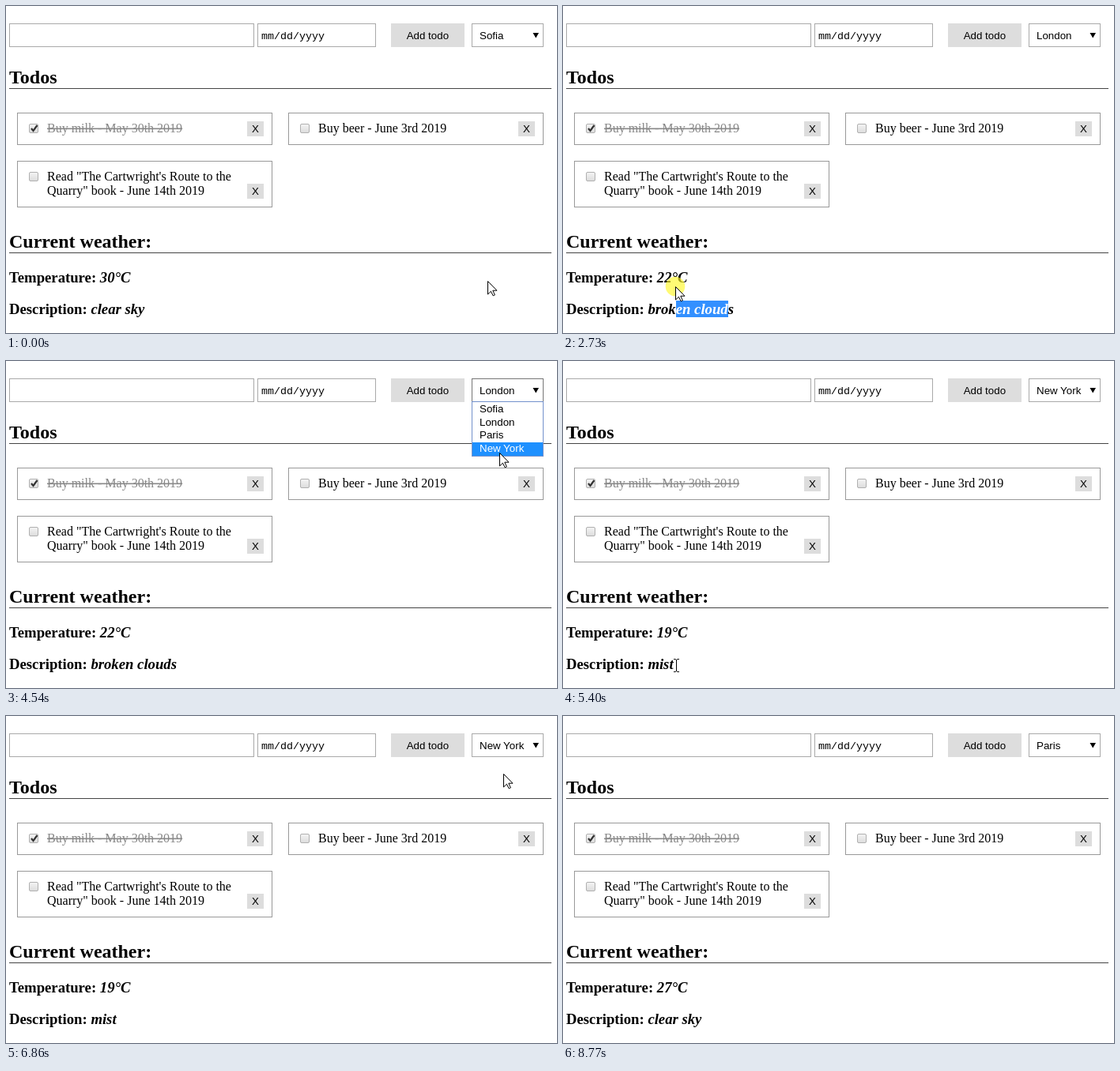
An HTML page for the animation above (9.64 s loop, 697 by 414 pixels).

```html
<!DOCTYPE html>
<html lang="en">
<head>
<meta charset="utf-8">
<title>Todos and weather</title>
<style>
  html, body { margin: 0; width: 100%; height: 100%; overflow: hidden; background: #fff; }
  svg { position: absolute; left: 0; top: 0; }
  text { white-space: pre; }
  .serif { font: 16px "Liberation Serif", "Times New Roman", serif; }
  .head { font: bold 24px "Liberation Serif", "Times New Roman", serif; }
  .sans { font: 13.333px "Liberation Sans", Arial, sans-serif; }
  .mono { font: 13.333px "Liberation Mono", "Courier New", monospace; }
  .done { fill: #888; text-decoration: line-through; }
  h3 {
    position: absolute; left: 4px; margin: 0; white-space: pre;
    font: bold 18.72px/21px "Liberation Serif", "Times New Roman", serif;
  }
  #temp { top: 333px; }
  #desc { top: 373px; }
  mark { background: #3390ff; color: #fff; }
</style>
</head>
<body>
<svg id="page" width="697" height="414"></svg>
<h3 id="temp"></h3>
<h3 id="desc"></h3>
<svg id="overlay" width="697" height="414">
  <g id="list"></g>
  <g id="pointer">
    <circle id="halo" r="12.3" fill="#fff82a" fill-opacity=".65"/>
    <path id="arrow" d="M.5 .5V17L4.4 13.2L7.2 18.8L9.4 17.8L6.8 12.2H12Z" fill="#fff" stroke="#000"/>
    <path id="beam" d="M-3 -7.5H-1L.5 -6.5L2 -7.5H4M.5 -6.5V7.5M-3 8.5H-1L.5 7.5L2 8.5H4" fill="none" stroke="#000"/>
    <path id="hand" d="M-1.5 1.5Q0 -.5 1.5 1.5V7Q3 5.5 4.5 7.5Q6 6.5 7.5 8.5Q10.5 7.5 10.5 10.5V15L8.5 21.5H-1L-5.5 13Q-5.5 10.5 -3.5 11.5L-1.5 13.5Z" fill="#fff" stroke="#000"/>
  </g>
</svg>
<script>
const LOOP = 9640, TICK = 77;
const $ = id => document.getElementById(id);

const cities = ["Sofia", "London", "Paris", "New York"];
const weather = [["30°C", "clear sky"], ["22°C", "broken clouds"], ["27°C", "clear sky"], ["19°C", "mist"]];

// Pointer moves: first step, last step, x, y
const moves = [
  [70, 130, 609, 93], [380, 530, 615, 47], [1170, 1170, 616, 47], [1420, 1420, 624, 67],
  [1500, 1660, 624, 84], [1890, 2270, 209, 385], [2420, 2500, 143, 383], [2580, 2730, 142, 355],
  [2810, 2880, 122, 340], [3130, 3210, 263, 369], [3530, 3690, 570, 27], [3840, 3910, 597, 40],
  [4310, 4540, 624, 116], [5000, 5400, 143, 385], [5550, 5630, 108, 384], [5710, 5860, 112, 366],
  [5940, 6010, 123, 353], [6320, 6400, 200, 362], [6470, 6860, 629, 73], [7030, 7110, 620, 40],
  [7270, 7430, 622, 95], [7780, 8620, 593, 405], [8700, 8700, 570, 408], [8770, 8770, 570, 440]
];

// pick: [description from, to, temperature from]
const events = [
  [0, { city: 0, sky: 0, open: false, press: false, pick: null }],
  [850, { press: true }], [930, { open: true }], [1010, { press: false }],
  [1810, { press: true }], [1890, { open: false, city: 1 }], [1960, { press: false }],
  [2120, { sky: 1 }],
  [2350, { press: true }], [2420, { pick: [8, 12] }], [2500, { pick: [4, 12] }],
  [2810, { pick: [0, 12, 2] }], [2880, { pick: [0, 12, 0] }], [3050, { press: false }],
  [3290, { press: true, pick: null }], [3360, { press: false }],
  [4230, { press: true }], [4310, { open: true }], [4390, { press: false }],
  [4920, { press: true }], [5000, { open: false, city: 3 }], [5080, { press: false }],
  [5230, { sky: 3 }],
  [5470, { press: true }], [5550, { pick: [2, 4] }], [5630, { pick: [0, 4] }],
  [5940, { pick: [0, 4, 1] }], [6010, { pick: [0, 4, 0] }], [6170, { press: false }],
  [6400, { press: true, pick: null }], [6470, { press: false }],
  [7190, { press: true, open: true }], [7350, { press: false }],
  [7700, { press: true }], [7780, { open: false, city: 2 }], [7860, { press: false }],
  [8010, { sky: 2 }]
];

const text = (x, y, style, s, extra = "") => `<text x="${x}" y="${y}" class="${style}" ${extra}>${s}</text>`;
const fill = (x, y, w, h, color) => `<rect x="${x}" y="${y}" width="${w}" height="${h}" fill="${color}"/>`;
const frame = (x, y, w, h, color, extra = "") =>
  `<rect x="${x + .5}" y="${y + .5}" width="${w - 1}" height="${h - 1}" fill="#fff" stroke="${color}" ${extra}/>`;

function card(x, y, h, lines, done) {
  const tick = `<path d="M${x + 18} ${y + 20}l2.5 3l5 -7" fill="none" stroke="#333" stroke-width="2.2"/>`;
  return frame(x, y, 323, h, "#999")
    + `<rect x="${x + 15.5}" y="${y + 14.5}" width="11" height="11" rx="1.5" fill="url(#box)" stroke="#b0b0b0"/>`
    + (done ? tick : "")
    + lines.map((s, i) => text(x + 38, y + 25 + 18 * i, done ? "serif done" : "serif", s)).join("")
    + fill(x + 291, y + h - 30, 21, 19, "#ddd")
    + text(x + 301.5, y + h - 16, "sans", "X", 'text-anchor="middle"');
}

$("page").innerHTML = `<defs><linearGradient id="box" x2="0" y2="1">
  <stop stop-color="#f4f4f4"/><stop offset="1" stop-color="#dcdcdc"/></linearGradient></defs>`
  + frame(4, 22, 310, 30, "#a9a9a9") + frame(318, 22, 150, 30, "#a9a9a9")
  + text(323, 42, "mono", "mm/dd/yyyy")
  + fill(487, 22, 93, 30, "#ddd") + text(506.7, 42, "sans", "Add todo")
  + text(4, 98, "head", "Todos") + fill(4, 104, 686, 1, "#444")
  + card(14, 135, 41, ["Buy milk - May 30th 2019"], true)
  + card(357, 135, 41, ["Buy beer - June 3rd 2019"])
  + card(14, 196, 59, ['Read "The Cartwright\'s Route to the', 'Quarry" book - June 14th 2019'])
  + text(4, 306, "head", "Current weather:") + fill(4, 312, 686, 1, "#444")
  + frame(589, 22, 91, 30, "#a9a9a9", 'id="select"')
  + text(599, 42, "sans", "", 'id="city"')
  + '<path d="M666.5 34H674L670.25 40.5Z"/>';

function pointerAt(t) {
  let x = 609, y = 348;
  for (const [start, end, tx, ty] of moves) {
    if (t < start) break;
    const steps = Math.round((end - start) / TICK) + 1;
    const gap = steps > 1 ? (end - start) / (steps - 1) : 1;
    const part = Math.min(steps, Math.floor((t - start) / gap + 1e-3) + 1) / steps;
    x += (tx - x) * part;
    y += (ty - y) * part;
  }
  return [Math.round(x), Math.round(y)];
}

const stateAt = t => Object.assign({}, ...events.filter(e => e[0] <= t).map(e => e[1]));

const marked = (s, from, to) => from < to
  ? `${s.slice(0, from)}<mark>${s.slice(from, to)}</mark>${s.slice(to)}` : s;

function drawWeather({ sky, pick }) {
  const [degrees, words] = weather[sky];
  const [from, to, start] = pick || [0, 0];
  const both = start !== undefined;
  const label = "Description: ";
  $("temp").innerHTML = `Temperature: <em>${both ? marked(degrees + " ", start, degrees.length + 1) : degrees}</em>`;
  $("desc").innerHTML = `${marked(label, 0, both ? label.length : 0)}<em>${marked(words, from, to)}</em>`;
}

function drawList({ open, city }, y) {
  const row = Math.floor((y - 52) / 17);
  const active = cities[row] ? row : city;
  $("list").innerHTML = open ? frame(589, 51, 91, 70, "#7391cc")
    + fill(590, 52 + 17 * active, 89, 17, "#1e90ff")
    + cities.map((s, i) => text(599, Math.round(65 + 16.6 * i), "sans", s, i === active ? 'fill="#fff"' : "")).join("") : "";
}

function drawPointer(x, y, press) {
  const onLine = x < 217 && (y >= 333 && y < 354 || y >= 373 && y < 394);
  const onButton = x >= 487 && x < 580 && y >= 22 && y < 52;
  const kind = onLine ? "beam" : onButton ? "hand" : "arrow";
  for (const id of ["arrow", "beam", "hand"]) $(id).style.display = id === kind ? "" : "none";
  $("halo").style.display = press ? "" : "none";
  $("pointer").setAttribute("transform", `translate(${x} ${y})`);
}

let shown = "";
function render(t) {
  const [x, y] = pointerAt(t), state = stateAt(t);
  const key = JSON.stringify([x, y, state]);
  if (key === shown) return;
  shown = key;
  const hover = state.open || x >= 589 && x < 680 && y >= 22 && y < 52;
  $("select").setAttribute("stroke", hover ? "#767676" : "#a9a9a9");
  $("city").textContent = cities[state.city];
  drawWeather(state);
  drawList(state, y);
  drawPointer(x, y, state.press);
}

const begin = performance.now();
function loop() {
  render((performance.now() - begin) % LOOP);
  requestAnimationFrame(loop);
}
loop();
</script>
</body>
</html>
```
